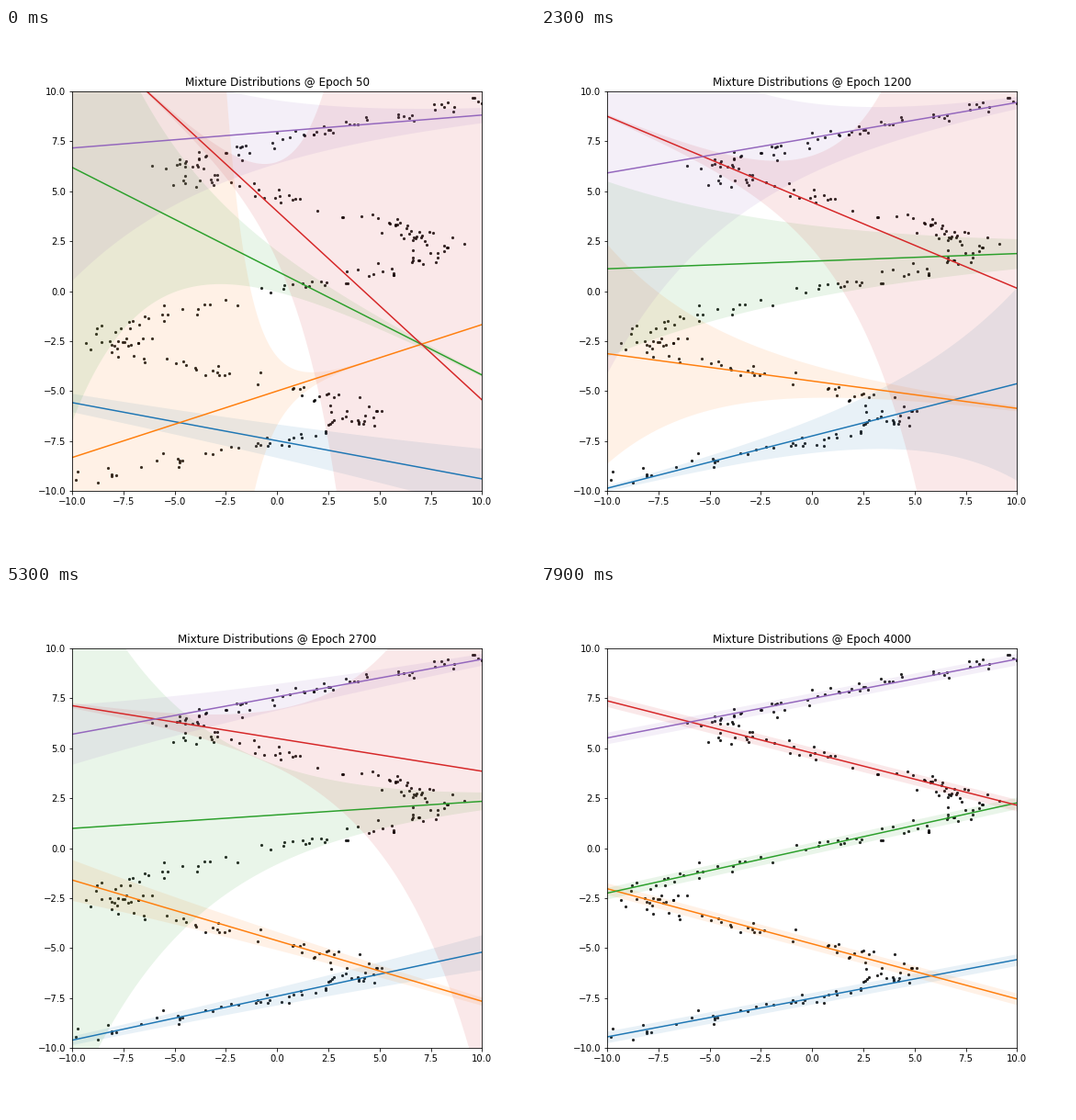
A matplotlib script for the animation above (8000 ms loop, 576 by 576 pixels).

```python
import numpy as np
import matplotlib.pyplot as plt
from matplotlib.animation import FuncAnimation

FRAMES, INTERVAL, EPOCH_STEP = 80, 100, 50
LIMIT = 10
FINAL_WIDTH = 0.29

# color: (key poses, resting line, settling power)
# pose: frame, offset, slope, half width at x=0, log growth of the width
COMPONENTS = {
    "tab:blue": ([(0, -7.49, -0.191, 0.84, 0.06),
                  (13, -7.25, 0.075, 0.97, 0.217),
                  (23, -7.25, 0.262, 0.835, 0.176)], (-7.515, 0.1935), 0.8),
    "tab:orange": ([(0, -5.0, 0.333, 1.72, -0.9),
                    (13, -4.83, -0.2175, 0.95, -0.304),
                    (23, -4.5, -0.137, 0.82, -0.19),
                    (37, -4.495, -0.3275, 0.675, -0.15)], (-4.79, -0.276), 0.8),
    "tab:green": ([(0, 1.0, -0.52, 1.03, -0.251),
                   (13, 1.315, 0.0235, 1.32, -0.022),
                   (37, 1.765, 0.0585, 2.81, -0.182)], (0.01, 0.226), 3),
    "tab:red": ([(0, 4.0, -0.945, 2.47, 0.525),
                 (13, 3.97, -0.553, 2.83, 0.36),
                 (45, 5.515, -0.1615, 1.525, 0.248)], (4.765, -0.2615), 2.5),
    "tab:purple": ([(0, 7.995, 0.0825, 1.584, -0.143),
                    (13, 7.575, -0.1075, 2.12, 0.055),
                    (23, 7.685, 0.1765, 1.74, -0.175)], (7.495, 0.1975), 1),
}


def sample_points(count=320):
    """Noisy sine laid on its side."""
    rng = np.random.default_rng(7)
    y = rng.uniform(-10.5, 10.5, count)
    return 7 * np.sin(0.75 * y) + 0.5 * y + rng.normal(size=count), y


class Component:
    def __init__(self, color, poses, rest, power):
        keys = np.array(poses + [(FRAMES - 1, *rest, FINAL_WIDTH, 0)], float)
        keys[:, 3] = np.log(keys[:, 3])
        self.times, self.poses, self.power = keys[:, 0], keys[:, 1:], power
        self.band = ax.fill_between(x, x, x, color=color, alpha=0.1, linewidth=0)
        self.line, = ax.plot(x, x, color=color, lw=1.5)

    def pose(self, frame):
        last = len(self.times) - 2
        k = min(np.searchsorted(self.times, frame, side="right") - 1, last)
        u = (frame - self.times[k]) / (self.times[k + 1] - self.times[k])
        if k == last:
            u **= self.power
        return self.poses[k] * (1 - u) + self.poses[k + 1] * u

    def update(self, frame):
        offset, slope, log_width, growth = self.pose(frame)
        mean = offset + slope * x
        width = np.exp(log_width + growth * x)
        low, high = np.clip([mean - width, mean + width], -40, 40)
        outline = np.column_stack([np.r_[x, x[::-1]], np.r_[low, high[::-1]]])
        self.band.set_verts([outline])
        self.line.set_ydata(mean)


fig = plt.figure(figsize=(8, 8), dpi=72, facecolor="white")
fig.subplots_adjust(left=0.125, right=0.9, bottom=0.12501, top=0.88)
ax = fig.add_subplot()
ticks = np.linspace(-LIMIT, LIMIT, 9)
ax.set(xlim=(-LIMIT, LIMIT), ylim=(-LIMIT, LIMIT), xticks=ticks, yticks=ticks)
title = ax.set_title("", fontsize=12)
ax.scatter(*sample_points(), s=10, c="black", linewidths=0, alpha=0.85)

x = np.linspace(-LIMIT, LIMIT, 300)
components = [Component(color, *spec) for color, spec in COMPONENTS.items()]


def update(frame):
    title.set_text(f"Mixture Distributions @ Epoch {(frame + 1) * EPOCH_STEP}")
    for component in components:
        component.update(frame)
    return [title]


animation = FuncAnimation(fig, update, frames=FRAMES, interval=INTERVAL,
                          init_func=lambda: update(0), repeat=True,
                          repeat_delay=0, blit=False)
plt.show()
```
